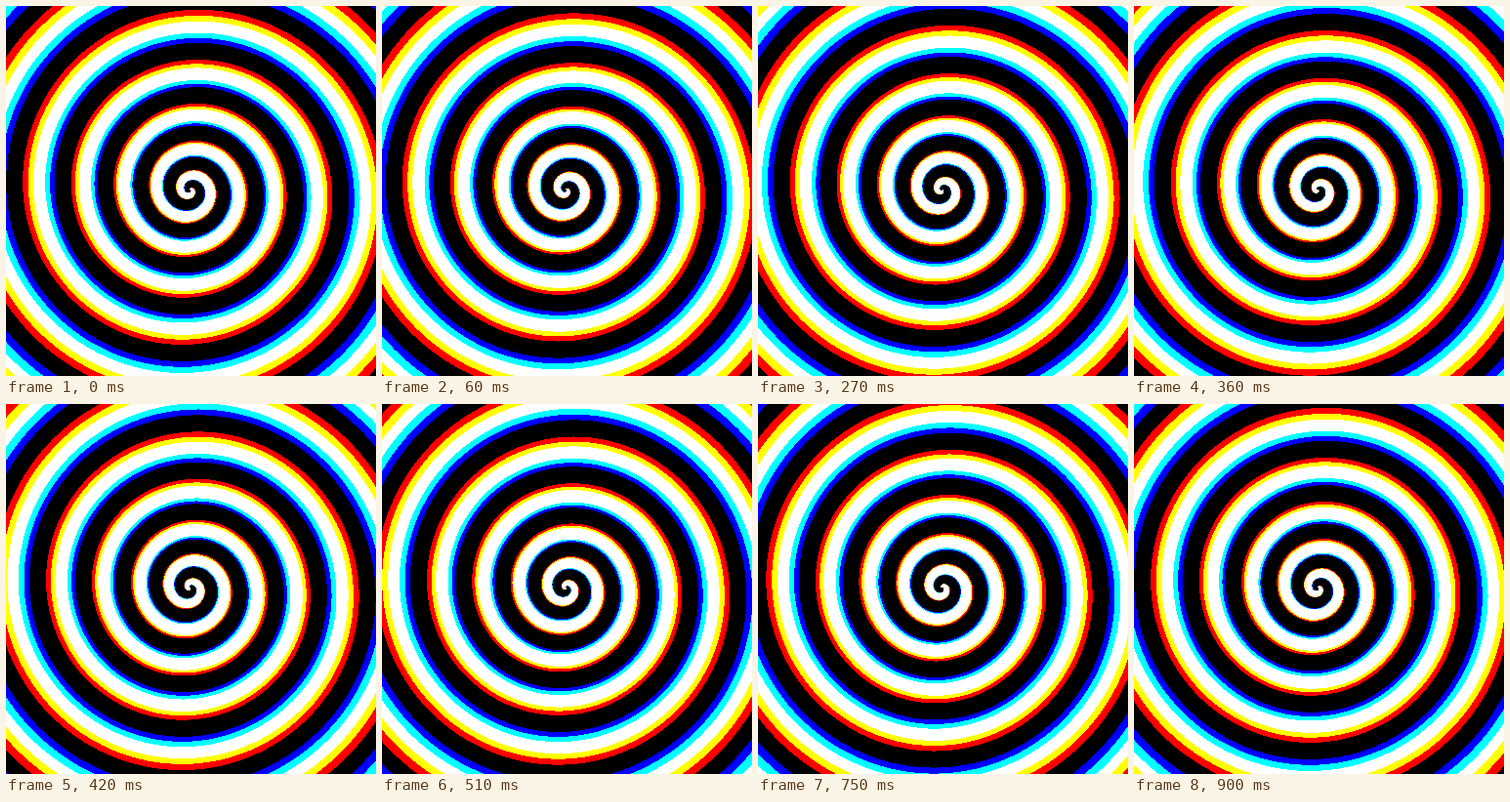
These frames come from a looping animation (379x379 px, 930 ms). An HTML page with a canvas:

```html
<!DOCTYPE html>
<html lang="en">
<head>
<meta charset="utf-8">
<title>Spiral</title>
<style>
  html, body { margin: 0; width: 100%; height: 100%; overflow: hidden; background: #000; }
  canvas { display: block; width: 379px; height: 379px; }
</style>
</head>
<body>
<canvas id="stage" width="379" height="379"></canvas>
<script>
const SIZE = 379, MID = 188;
const STEP_MS = 30, STEPS = 31, STEPS_PER_TURN = 30;
const POWER = 0.65, PITCH = 5.655, EDGE = 29.71, DUTY = 0.45;
// Each colour channel draws the same arm at a slightly smaller scale.
const SCALES = [1, 1.034, 1.068];

const ctx = document.getElementById('stage').getContext('2d');
const image = ctx.createImageData(SIZE, SIZE);
const pixels = image.data;

const frac = v => v - Math.floor(v);

// Position across the arm, in turns, for every pixel of every channel.
const phase = new Float32Array(pixels.length);
for (let y = 0, i = 0; y < SIZE; y++) {
  for (let x = 0; x < SIZE; x++, i += 4) {
    const dx = x - MID, dy = y - MID;
    const turn = Math.atan2(-dx, -dy) / (2 * Math.PI);
    const radius = Math.hypot(dx, dy);
    SCALES.forEach((scale, c) => {
      const u = Math.pow(radius * scale, POWER);
      phase[i + c] = frac((EDGE - u) / PITCH - turn);
    });
    pixels[i + 3] = 255;
  }
}

function draw(step) {
  const shift = frac(step / STEPS_PER_TURN);
  for (let i = 0; i < pixels.length; i += 4) {
    for (let c = i; c < i + 3; c++) {
      let p = phase[c] - shift;
      if (p < 0) p += 1;
      pixels[c] = p < DUTY ? 255 : 0;
    }
  }
  ctx.putImageData(image, 0, 0);
}

let start = null, shown = 0;
function tick() {
  const now = performance.now();
  if (start === null) start = now;
  const step = Math.floor((now - start) / STEP_MS) % STEPS;
  if (step !== shown) draw(shown = step);
  requestAnimationFrame(tick);
}

draw(0);
tick();
</script>
</body>
</html>
```
